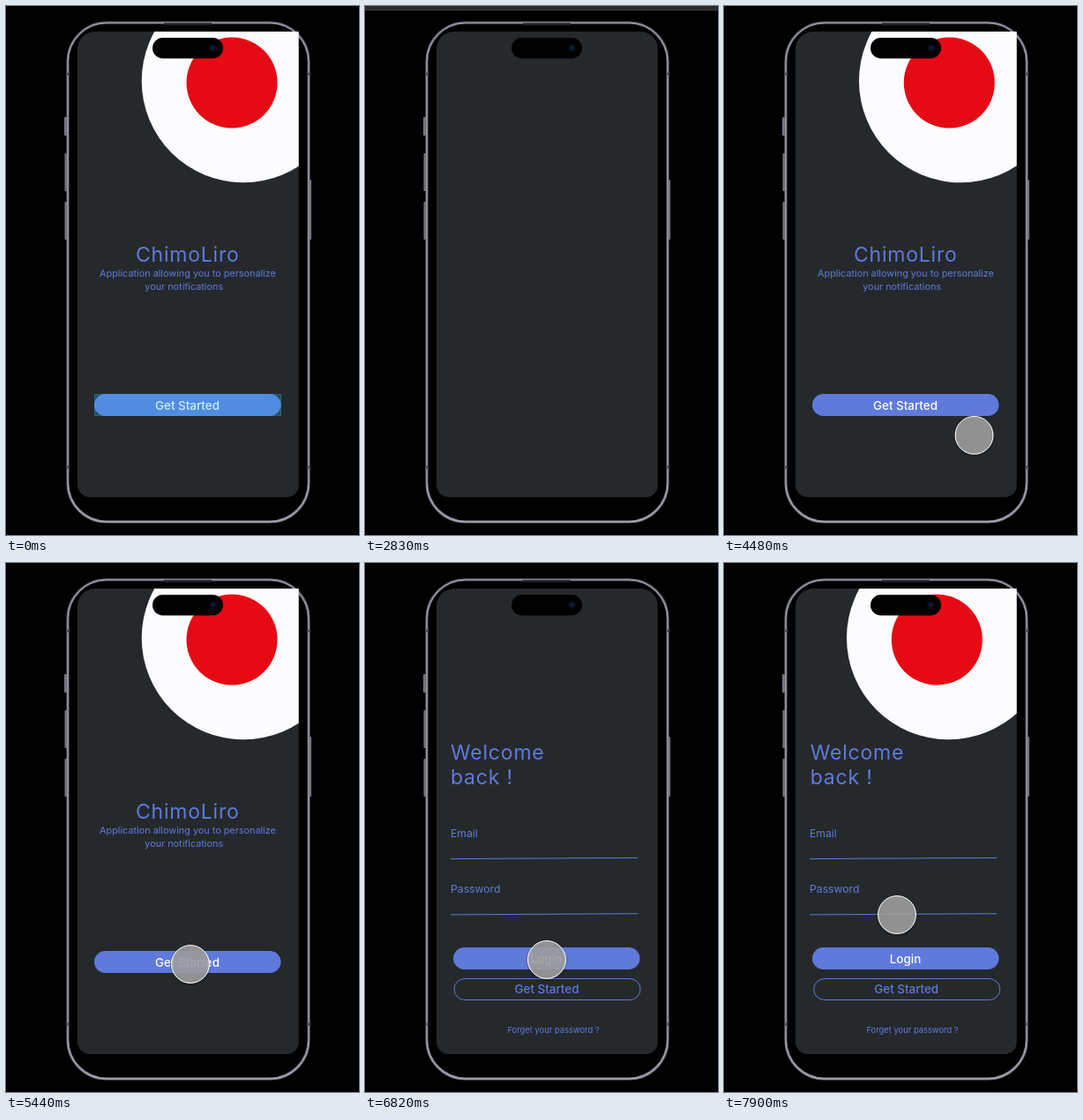
These frames come from a looping animation (400 px wide and 600 px high, 8000 ms). An HTML page:

```html
<!DOCTYPE html>
<html lang="en">
<head>
<meta charset="utf-8">
<title>Phone prototype</title>
<style>
  html, body { margin: 0; height: 100%; overflow: hidden; background: #000; }
  svg { display: block; width: 100vw; height: 100vh; }
  text { font-family: Inter, sans-serif; fill: #5f7bdc; }
  .mid { text-anchor: middle; }
  .title { font-size: 23px; letter-spacing: .8px; }
  .small { font-size: 10.85px; }
  .label { font-size: 12.2px; }
  .action { font-size: 13.4px; font-weight: 500; }
  .light { fill: #fff; }
  .fill { fill: #5f7adb; }
  .line { fill: none; stroke: #5f7adb; }
</style>
</head>
<body>
<svg viewBox="0 0 400 600">
  <defs>
    <clipPath id="screen"><rect x="81" y="29" width="250.7" height="528"/></clipPath>
    <filter id="shadow" x="-30%" y="-30%" width="160%" height="160%">
      <feDropShadow dx="0" dy="1.5" stdDeviation="1.5" flood-opacity=".4"/>
    </filter>
    <linearGradient id="metal" x2="0" y2="1">
      <stop stop-color="#5c5a64"/><stop offset=".1" stop-color="#66646f"/>
      <stop offset=".9" stop-color="#66646f"/><stop offset="1" stop-color="#86838f"/>
    </linearGradient>
    <path id="panel" d="M81 49a20 20 0 0 1 20 -20H312a20 20 0 0 1 20 20V543a14 14 0 0 1 -14 14H95a14 14 0 0 1 -14 -14z"/>
    <g id="badge">
      <circle cx="269" cy="85" r="115.3" fill="#fcfbfe"/>
      <circle cx="256" cy="87" r="51.5" fill="#e60a14"/>
    </g>
  </defs>

  <g fill="#77747f">
    <rect x="66" y="126" width="4" height="21" rx="1"/>
    <rect x="66.5" y="167" width="4" height="43" rx="1"/>
    <rect x="66.5" y="222" width="4" height="43" rx="1"/>
    <rect x="342.5" y="197" width="3.5" height="68" rx="1"/>
  </g>
  <rect x="70" y="19" width="273" height="566" rx="44" stroke="url(#metal)" stroke-width="3"/>
  <rect x="70" y="19" width="273" height="566" rx="44" fill="none" stroke="#b5b2be" stroke-width="1"/>
  <path d="M179 20.5H233" stroke="#24232a" stroke-width="2.5"/>
  <path d="M68 77h4M68 523h4M341 77h4M341 523h4" stroke="#4a4850" stroke-width="3"/>

  <g clip-path="url(#screen)">
    <g id="start">
      <use href="#panel" fill="#25292c"/>
      <g id="startContent">
        <use href="#badge" id="startBadge"/>
        <g id="intro" class="mid">
          <text class="title" x="205.8" y="290">ChimoLiro</text>
          <text class="small" x="206" y="307">Application allowing you to personalize</text>
          <text class="small" x="201.7" y="322">your notifications</text>
        </g>
        <g id="startButton" class="mid">
          <rect class="fill" x="100" y="440" width="211.5" height="25" rx="12.5"/>
          <text class="action light" x="205.5" y="457.7">Get Started</text>
        </g>
        <rect id="hint" x="100.5" y="440.5" width="211" height="24" fill="#2bbef0" fill-opacity=".25" stroke="#2bbef0" stroke-opacity=".35"/>
      </g>
      <rect id="dim" x="81" y="29" width="251" height="528"/>
    </g>
    <g id="login">
      <use href="#panel" fill="#25292c"/>
      <g id="nudge">
        <text class="title" x="97" y="223">Welcome</text>
        <text class="title" x="97" y="251">back !</text>
        <rect class="line" x="101" y="471.5" width="211" height="24" rx="12"/>
        <text class="action mid" x="206" y="488">Get Started</text>
      </g>
      <text class="label" x="97" y="311">Email</text>
      <text class="label" x="97" y="374">Password</text>
      <path class="line" d="M97 335.6L309 334.4M97 398.9L309 397.7"/>
      <rect class="fill" x="100" y="436" width="211.5" height="25" rx="12.5"/>
      <text class="action light mid" x="205.5" y="453.6">Login</text>
      <text class="mid" x="213.5" y="533" font-size="9.4">Forget your password ?</text>
      <use href="#badge" id="loginBadge"/>
    </g>
  </g>

  <rect x="166" y="36" width="80" height="23.5" rx="11.75"/>
  <circle cx="234.5" cy="47.5" r="4.5" fill="#090b1a"/>
  <circle cx="234.5" cy="47.5" r="1.8" fill="#17224a"/>

  <g id="cursor" filter="url(#shadow)">
    <circle r="21.4" fill="#a2a2a2" fill-opacity=".85" stroke="#fff"/>
  </g>
  <g id="bar">
    <rect width="400" height="6" fill="#2c2c2c"/>
    <rect y="6" width="400" height="1" fill="#464646"/>
  </g>
</svg>

<script>
const LOOP = 8000, RESTART = 2830, INTRO = 3545, SLIDE = 5810, SLIDE_END = 6500, LOGIN_INTRO = 7503;

// Pointer stops: time, x, y
const pointer = [
  [3960, 430, 515], [4090, 385, 532], [4330, 310, 530], [4480, 284, 487],
  [4840, 108, 425], [5200, 221, 455], [5440, 209, 455], [5590, 207, 453],
  [6780, 207, 453], [6820, 206, 450], [7540, 200, 419], [7900, 196, 399]
];

const el = {};
document.querySelectorAll('[id]').forEach(node => el[node.id] = node);

const clamp = v => Math.min(1, Math.max(0, v));
const ramp = (t, from, to) => clamp((t - from) / (to - from));
const easeInOut = x => x < .5 ? 4 * x ** 3 : 1 - 4 * (1 - x) ** 3;
const move = (node, x, y = 0) => node.setAttribute('transform', `translate(${x} ${y})`);
const fade = (node, alpha) => node.setAttribute('opacity', alpha);
const show = (node, on) => node.setAttribute('visibility', on ? 'inherit' : 'hidden');

function spring(ms) {
  if (ms <= 0) return 0;
  const s = ms / 1000, damp = 6, freq = 11;
  return 1 - Math.exp(-damp * s) * (Math.cos(freq * s) + damp / freq * Math.sin(freq * s));
}

function pointerAt(t) {
  if (t >= pointer.at(-1)[0]) return pointer.at(-1).slice(1);
  const i = Math.max(1, pointer.findIndex(stop => stop[0] > t));
  const [a, b] = [pointer[i - 1], pointer[i]];
  const k = ramp(t, a[0], b[0]);
  return [a[1] + (b[1] - a[1]) * k, a[2] + (b[2] - a[2]) * k];
}

function draw(t) {
  const intro = t < RESTART ? 1 : spring(t - INTRO);
  move(el.startBadge, 190 * (1 - intro));
  move(el.intro, 6 * (1 - intro), -4 * (1 - intro));
  fade(el.intro, clamp(intro));
  fade(el.startButton, clamp(intro));
  fade(el.hint, t < 1140 ? 1 - ramp(t, 60, 360) : 1 - ramp(t, 1260, 1560));
  move(el.bar, 0, 7 * (ramp(t, 1500, 1740) - ramp(t, RESTART - 80, 3070) - 1));

  const slide = easeInOut(ramp(t, SLIDE, SLIDE_END));
  move(el.startContent, -62 * slide);
  fade(el.dim, .5 * slide);
  show(el.start, slide < 1);
  show(el.login, slide > 0);
  move(el.login, 251 * (1 - slide));

  const filled = t >= LOGIN_INTRO;
  move(el.nudge, filled ? .7 : 0);
  move(el.loginBadge, 190 * (1 - spring(t - LOGIN_INTRO)));
  show(el.loginBadge, filled);

  show(el.cursor, t >= pointer[0][0]);
  move(el.cursor, ...pointerAt(t));
}

function tick(now) {
  draw(now % LOOP);
  requestAnimationFrame(tick);
}
draw(0);
requestAnimationFrame(tick);
</script>
</body>
</html>
```
